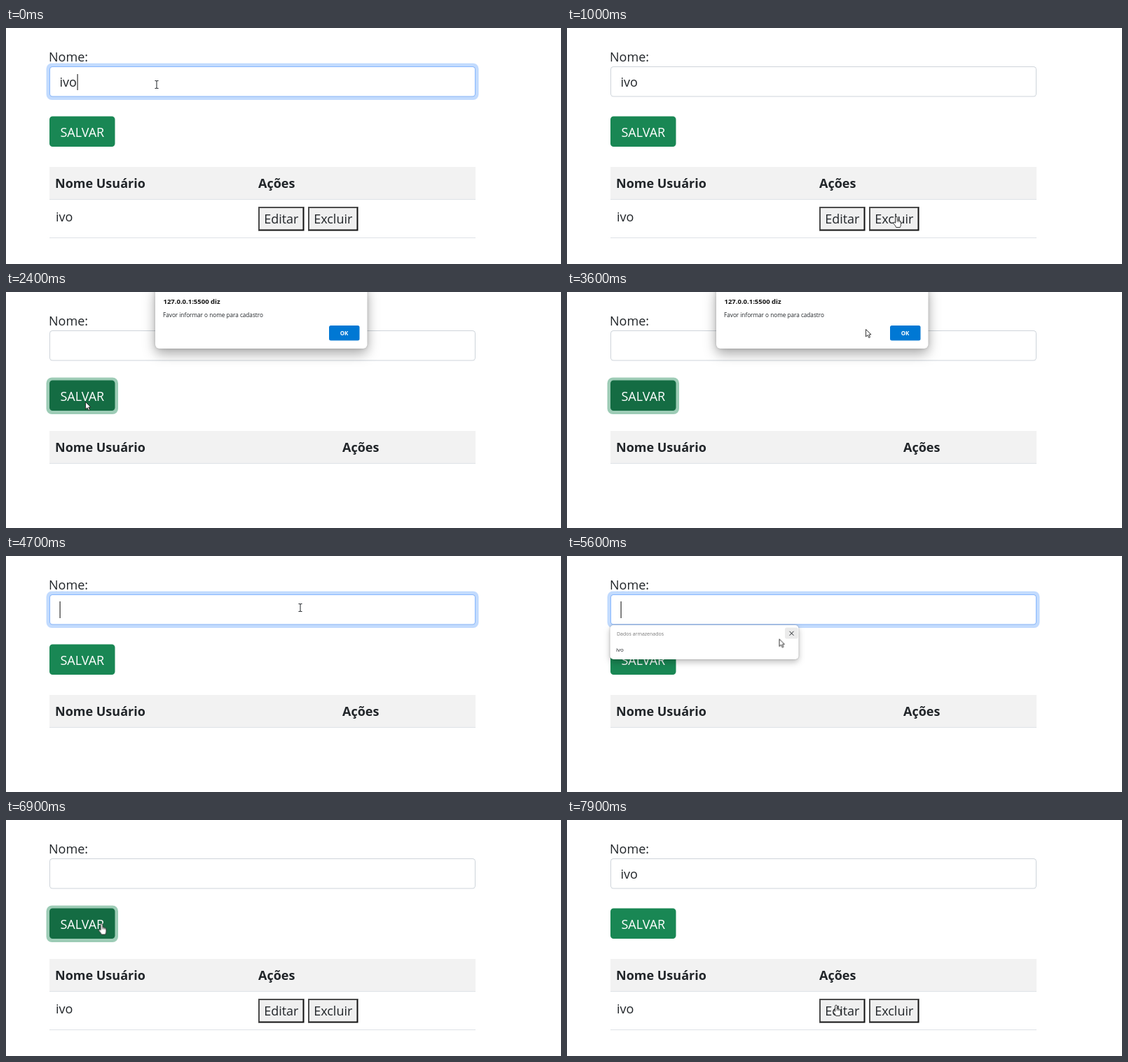
An HTML page for the animation above (8000 ms loop, 792 by 338 pixels).

```html
<!DOCTYPE html>
<html lang="pt-BR">
<head>
<meta charset="utf-8">
<title>Cadastro</title>
<style>
html, body { margin: 0; width: 100%; height: 100%; overflow: hidden; background: #fff; }
svg { display: block; width: 792px; height: 338px; }
text { font: 18px "Open Sans", "Noto Sans", sans-serif; fill: #212529; }
.bold { font-weight: 700; }
.white { fill: #fff; }
.shadow { filter: drop-shadow(0 7px 9px rgba(0,0,0,.3)) drop-shadow(0 0 2px rgba(0,0,0,.2)); }
.soft { filter: drop-shadow(0 4px 5px rgba(0,0,0,.2)) drop-shadow(0 0 1px rgba(0,0,0,.3)); }
.outline { fill: none; stroke: #212529; stroke-width: 1; }

/* One 8 s timeline: 1.25% is one 100 ms step */
.focus, .auto, .typed, .caret-end, .caret-start, .row, .head, .save, .save-ring,
.alert, .ok, .list, .close, .option, .cursor, .beam, .arrow, .hand {
  animation: 8s step-end infinite;
}
.focus { animation-name: focus; }
.auto { animation-name: auto; }
.typed { animation-name: typed; }
.caret-end { animation-name: caret-end; }
.caret-start { animation-name: caret-start; }
.row { animation-name: row; }
.head { animation-name: head; }
.save { animation-name: save; }
.save-ring { animation-name: save-ring; }
.alert { animation-name: alert; }
.ok { animation-name: ok; }
.list { animation-name: list; }
.close { animation-name: close; }
.option { animation-name: option; }
.cursor { animation-name: cursor; }
.beam { animation-name: beam; }
.arrow { animation-name: arrow; }
.hand { animation-name: hand; }

@keyframes focus { 0%, 56.25% { opacity: 1 } 12.5%, 82.5% { opacity: 0 } }
@keyframes auto { 0%, 82.5% { opacity: 0 } 71.25% { opacity: 1 } }
@keyframes typed { 0%, 71.25%, 96.25% { opacity: 1 } 15%, 82.5% { opacity: 0 } }
@keyframes caret-end { 0%, 11.25%, 75% { opacity: 1 } 5%, 12.5%, 81.25% { opacity: 0 } }
@keyframes caret-start { 0%, 63.75%, 71.25% { opacity: 0 } 57.5%, 66.25% { opacity: 1 } }
@keyframes row { 0%, 82.5% { opacity: 1 } 15% { opacity: 0 } }
@keyframes head { 0%, 82.5% { transform: none } 15% { transform: translateX(120px) } }
@keyframes save {
  0%, 56.25%, 96.25% { fill: #198754 }
  26.25%, 78.75% { fill: #157347 }
  27.5%, 82.5% { fill: #146c43 }
}
@keyframes save-ring { 0%, 56.25%, 96.25% { opacity: 0 } 27.5%, 82.5% { opacity: 1 } }
@keyframes alert { 0%, 56.25% { opacity: 0 } 30% { opacity: 1 } }
@keyframes ok { 0% { fill: #0078d4 } 48.75% { fill: #1081d7 } 53.75% { fill: #1a86d9 } }
@keyframes list { 0%, 75% { opacity: 0 } 66.25% { opacity: 1 } }
@keyframes close { 0%, 71.25% { opacity: 0 } 67.5% { opacity: 1 } }
@keyframes option { 0%, 75% { opacity: 0 } 71.25% { opacity: 1 } }

@keyframes beam { 0%, 58.75% { opacity: 1 } 2.5%, 66.25% { opacity: 0 } }
@keyframes arrow {
  0%, 8.75%, 26.25%, 58.75%, 78.75%, 96.25% { opacity: 0 }
  2.5%, 16.25%, 30%, 66.25%, 90% { opacity: 1 }
  93.75% { opacity: 0 }
}
@keyframes hand {
  0%, 16.25%, 30%, 90% { opacity: 0 }
  8.75%, 26.25%, 78.75%, 93.75% { opacity: 1 }
}
@keyframes cursor {
  0% { transform: translate(215px, 81px) }
  1.25% { transform: translate(228px, 88px) }
  2.5% { transform: translate(252px, 103px) }
  3.75% { transform: translate(290px, 126px) }
  5% { transform: translate(338px, 154px) }
  6.25% { transform: translate(390px, 195px) }
  7.5% { transform: translate(434px, 232px) }
  8.75% { transform: translate(468px, 268px) }
  10% { transform: translate(474px, 277px) }
  11.25% { transform: translate(470px, 270px) }
  20% { transform: translate(428px, 249px) }
  21.25% { transform: translate(310px, 209px) }
  22.5% { transform: translate(178px, 181px) }
  23.75% { transform: translate(116px, 172px) }
  26.25% { transform: translate(114px, 159px) }
  27.5% { transform: translate(113px, 157px) }
  37.5% { transform: translate(118px, 156px) }
  38.75% { transform: translate(145px, 152px) }
  40% { transform: translate(208px, 146px) }
  41.25% { transform: translate(288px, 128px) }
  42.5% { transform: translate(350px, 95px) }
  43.75% { transform: translate(400px, 65px) }
  45% { transform: translate(426px, 53px) }
  46.25% { transform: translate(466px, 55px) }
  48.75% { transform: translate(474px, 56px) }
  50% { transform: translate(480px, 57px) }
  56.25% { transform: translate(474px, 60px) }
  57.5% { transform: translate(455px, 66px) }
  58.75% { transform: translate(420px, 74px) }
  60% { transform: translate(375px, 80px) }
  61.25% { transform: translate(335px, 83px) }
  62.5% { transform: translate(318px, 84px) }
  66.25% { transform: translate(318px, 88px) }
  67.5% { transform: translate(319px, 104px) }
  68.75% { transform: translate(315px, 111px) }
  70% { transform: translate(302.5px, 118.5px) }
  71.25% { transform: translate(232px, 128px) }
  72.5% { transform: translate(168px, 136px) }
  78.75% { transform: translate(147px, 145px) }
  80% { transform: translate(138px, 148px) }
  81.25% { transform: translate(136.5px, 148.5px) }
  88.75% { transform: translate(145px, 158px) }
  90% { transform: translate(184px, 186px) }
  91.25% { transform: translate(250px, 222px) }
  92.5% { transform: translate(325px, 250px) }
  93.75% { transform: translate(374px, 264px) }
  95% { transform: translate(384px, 265px) }
}
</style>
</head>
<body>
<svg viewBox="0 0 792 338">
  <text x="61" y="48">Nome:</text>

  <g class="focus">
    <rect x="57.5" y="50.5" width="617" height="52.5" rx="8" fill="#c2dbfe"/>
  </g>
  <rect x="62" y="55" width="608" height="43.5" rx="4.5" fill="#ced4da"/>
  <rect class="focus" x="62" y="55" width="608" height="43.5" rx="4.5" fill="#86b7fe"/>
  <rect x="63" y="56" width="606" height="41.5" rx="3.5" fill="#fff"/>
  <rect class="auto" x="63" y="56" width="606" height="41.5" rx="3.5" fill="#e8f0fe"/>
  <text class="typed" x="76.5" y="84">ivo</text>
  <rect class="caret-end" x="101.5" y="66" width="1.2" height="23" fill="#333"/>
  <rect class="caret-start" x="76.5" y="65" width="1.2" height="24" fill="#333"/>

  <rect class="save-ring" x="57.5" y="122.5" width="102.5" height="52.5" rx="8" fill="#9dccb6"/>
  <rect class="save" x="62" y="126.5" width="93.5" height="43.5" rx="4.5" fill="#198754"/>
  <text class="white" x="108.8" y="156" text-anchor="middle">SALVAR</text>

  <rect x="62" y="199" width="608" height="46" fill="#f2f2f2"/>
  <rect x="62" y="245" width="608" height="1" fill="#dee2e6"/>
  <text class="bold" x="70" y="229">Nome Usuário</text>
  <text class="bold head" x="360" y="229">Ações</text>

  <g class="row">
    <rect x="62" y="300" width="608" height="1" fill="#dee2e6"/>
    <text x="71" y="277">ivo</text>
    <path d="M360 256h65.5v34.5H360zM431 256h71.5v34.5H431z" fill="#111"/>
    <path d="M360 290.5V256h65.5l-2 2H362v30.500zM431 290.500V256h71.500l-2 2H433v30.500z" fill="#4c4c4c"/>
    <path d="M362 258h61.500v30.500H362zM433 258h67.500v30.500H433z" fill="#efefef"/>
    <text x="392.800" y="280" text-anchor="middle">Editar</text>
    <text x="466.800" y="280" text-anchor="middle">Excluir</text>
  </g>

  <g class="alert">
    <rect class="shadow" x="213" y="-10" width="302.5" height="91" rx="6" fill="#fff"/>
    <text class="bold" x="224.5" y="17" style="font-size:9.5px;fill:#111">127.0.0.1:5500 diz</text>
    <text x="224" y="36" style="font-size:8.2px">Favor informar o nome para cadastro</text>
    <rect class="ok" x="461" y="48" width="43.5" height="21.5" rx="2.5" fill="#0078d4"/>
    <text class="bold white" x="482.5" y="61.500" text-anchor="middle" style="font-size:8px">OK</text>
  </g>

  <g class="list">
    <rect class="soft" x="61.500" y="99" width="269" height="49" rx="5" fill="#fff"/>
    <rect class="option" x="63" y="124" width="266" height="19" rx="3" fill="#f0f0f0"/>
    <text x="71" y="113.500" style="font-size:7px;fill:#767676">Dados armazenados</text>
    <text x="70" y="136.500" style="font-size:8px">ivo</text>
    <rect class="close" x="311" y="102.500" width="18.500" height="16" rx="2.500" fill="#ebebeb"/>
    <path class="outline" d="M317.500 107.800l6 6m0-6l-6 6"/>
  </g>

  <g class="cursor">
    <path class="beam outline" d="M-2.500-5.500H-1L0-5 1-5.500H2.500M0-5V5M-2.500 5.500H-1L0 5 1 5.500H2.500" stroke="#555"/>
    <path class="arrow" d="M.500.500V11L3 8.700 4.800 12.500 6.500 11.700 4.800 8H8z" fill="#fff" stroke="#222" stroke-width=".9"/>
    <g class="hand" stroke="#222" stroke-width=".9">
      <path d="M-1.300 1.300Q-1.300.200 0 .200T1.300 1.300V5.300Q2.800 4.800 3.400 5.900 4.700 5.300 5.200 6.500 6.500 6.300 6.500 7.800V10.500Q6.400 13.500 5.300 15.500H-.300Q-1.300 13-3.800 10.300-4.600 8.700-3.300 8.200-2.400 8-1.300 9.200z" fill="#fff"/>
      <path d="M1.300 5.300V8M3.400 5.900V8.200M5.200 6.500V8.400" fill="none" stroke-width=".7"/>
    </g>
  </g>
</svg>
</body>
</html>
```
